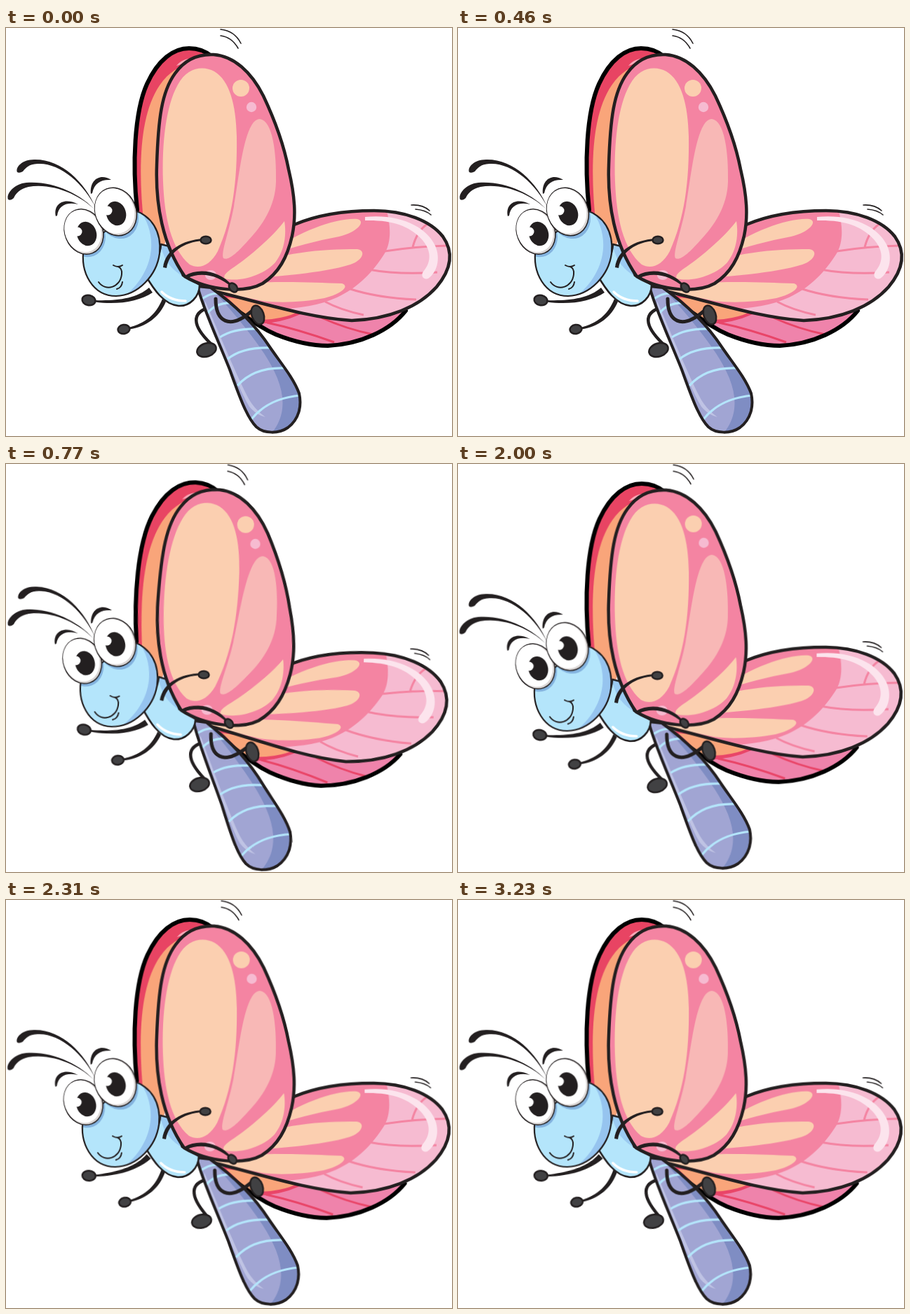
An HTML page that plays this animation: 636 by 583 pixels, repeating every 3.85 s.

```html
<!DOCTYPE html>
<html lang="en">
<head>
<meta charset="utf-8">
<title>Butterfly</title>
<style>
html, body { margin: 0; width: 100%; height: 100%; overflow: hidden; background: #fff; }
svg { display: block; width: 100%; height: 100%; }
.ink { fill: #231f20; }
.line { fill: none; stroke: #231f20; stroke-linecap: round; stroke-linejoin: round; }
.rim { fill: none; stroke: #000; stroke-width: 6; stroke-linecap: round; }
.pink { fill: #f484a2; }
.peach { fill: #fbcfb0; }
.hand { fill: #414143; stroke: #231f20; stroke-width: 2.5; }
.band { fill: none; stroke: #b4e5fb; stroke-width: 3.2; }
.vein { fill: none; stroke: #f484a2; stroke-width: 3; }
.red { fill: none; stroke: #e94568; stroke-width: 3; }

#bug, .limb { animation: 3850ms step-end infinite; }
#bug { transform-origin: 0 0; animation-name: sway; }
#arm1 { transform-origin: 162px 382px; --turn: -9deg; }
#arm2 { transform-origin: 210px 387px; --turn: -4deg; }
#foot { transform-origin: 285px 400px; --turn: 5deg; }
.limb { animation-name: kick; }
@keyframes sway {
  0% { transform: none; }
  20% { transform: translate(10.9px, -14.3px) rotate(2.56deg); }
  40%, 100% { transform: translate(1.2px, -2.6px) rotate(.37deg); }
}
@keyframes kick {
  0% { transform: none; }
  60%, 100% { transform: rotate(var(--turn)); }
}
</style>
</head>
<body>
<svg viewBox="0 0 636 583" preserveAspectRatio="none">
<defs>
  <path id="tail" d="M273 369C280 398 301 443 319 488C332 524 343 556 357 570C368 580 389 580 402 571C418 559 422 540 418 522C410 500 392 479 377 457C356 425 326 395 292 371Z"/>
  <path id="hind" d="M411 281C446 266 488 261 525 261C568 261 605 275 623 298C640 322 634 346 614 370C588 399 546 416 493 418C428 414 358 390 280 372Z"/>
  <path id="low" d="M300 384C335 405 355 425 385 438C415 450 438 454 459 454C505 452 548 432 570 404L480 400L330 380Z"/>
  <path id="back" d="M187 260C180 195 183 120 201 80C217 45 239 29 261 29C275 29 286 34 294 41L262 120L225 315Z"/>
  <path id="wing" d="M255 355C223 310 213 251 215 196C217 130 222 91 241 65C255 45 275 37 296 38C325 40 350 63 367 97C384 133 396 166 403 202C412 240 414 269 408 297C401 328 389 350 366 365C341 379 290 376 255 355Z"/>
  <path id="head" d="M111 314C105 350 124 383 157 383C189 382 215 353 219 322C222 291 208 268 181 260Z"/>
  <path id="chest" d="M198 352C211 374 225 395 246 397C262 398 276 384 276 367L252 354L237 313L221 309Q220 332 198 352Z"/>
  <clipPath id="tailClip"><use href="#tail"/></clipPath>
  <clipPath id="hindClip"><use href="#hind"/></clipPath>
  <clipPath id="lowClip"><use href="#low"/></clipPath>
  <clipPath id="backClip"><use href="#back"/></clipPath>
  <clipPath id="headClip"><use href="#head"/></clipPath>
  <clipPath id="chestClip"><use href="#chest"/></clipPath>
</defs>
<g id="bug">
  <!-- motion marks -->
  <g class="line" stroke-width="1.6">
    <path d="M306 2Q326 4 335 22M306 11Q322 13 331 29"/>
    <path d="M578 253Q594 252 604 261M584 259Q598 260 606 267"/>
  </g>

  <!-- lower rear wing -->
  <use href="#low" fill="#ef83ab"/>
  <g clip-path="url(#lowClip)">
    <path fill="#e94568" d="M290 375H440L420 409Q385 425 346 422Z"/>
    <path fill="#f9a57a" d="M315 385L430 398Q400 419 349 417Z"/>
    <path class="red" d="M372 421Q415 430 468 449M450 414Q485 430 524 438"/>
  </g>
  <path class="rim" d="M303 386C335 405 355 425 385 438C415 450 438 454 459 454C505 452 548 432 570 404"/>

  <!-- upper rear wing -->
  <use href="#back" fill="#e84463"/>
  <g clip-path="url(#backClip)">
    <path fill="#f9a57a" d="M197 285C188 200 190 125 219 82C232 63 247 54 265 51L290 60L230 320Z"/>
    <path fill="#f8a9b8" d="M243 54Q251 43 270 43L276 48Q258 48 243 54Z"/>
  </g>
  <path class="rim" stroke-width="5" d="M187 260C180 195 183 120 201 80C217 45 239 29 261 29C275 29 286 34 294 41"/>

  <!-- side wing -->
  <use href="#hind" class="pink"/>
  <g clip-path="url(#hindClip)">
    <path fill="#f6bbd1" d="M541 255C549 280 550 305 540 322C524 348 502 371 472 385C448 396 418 401 385 402L480 430L640 400V255Z"/>
    <path class="vein" d="M540 319Q584 312 630 311M580 313Q586 290 601 280M517 345Q560 353 615 349M488 372Q530 386 585 388M455 391Q477 403 510 410"/>
    <g class="peach">
      <path d="M380 318C419 291 470 271 501 273C514 276 501 292 475 298C442 304 410 313 380 323Z"/>
      <path d="M340 345C390 320 450 316 501 316C514 318 509 332 491 338C450 351 385 354 340 360Z"/>
      <path d="M284 373C345 359 425 363 479 365C491 369 478 380 454 386C423 392 390 393 366 390Z"/>
    </g>
    <path fill="#fce4ed" d="M512 270C563 265 600 285 612 311C620 329 615 349 602 358C595 360 591 354 595 348C608 333 606 316 592 301C574 282 549 274 512 275Z"/>
  </g>
  <use href="#hind" class="line" stroke-width="4.5"/>

  <!-- limbs behind the body -->
  <g id="arm1" class="limb">
    <path class="ink" d="M204 371C186 387 157 390 127 389V391.500C158 396 190 391 209 378Z"/>
    <ellipse class="hand" cx="118" cy="389" rx="9.500" ry="7.200" transform="rotate(12 118 389)"/>
  </g>
  <g id="arm2" class="limb">
    <path class="ink" d="M223 387C214 410 198 422 175 428L176 430.500C200 427 219 413 228 391Z"/>
    <ellipse class="hand" cx="168" cy="430.500" rx="8.500" ry="6.500" transform="rotate(-8 168 430.500)"/>
  </g>
  <g id="foot" class="limb">
    <path class="line" stroke-width="4.500" d="M288 400C266 407 264 424 292 451"/>
    <ellipse class="hand" cx="286" cy="460" rx="14" ry="9.500" transform="rotate(-18 286 460)"/>
  </g>

  <!-- tail -->
  <use href="#tail" fill="#a1a5d3"/>
  <g clip-path="url(#tailClip)">
    <path fill="#7f8dc3" d="M288 367C314 395 345 430 368 465C394 505 407 545 378 580H428V500L340 390Z"/>
    <path fill="#bfc3e4" d="M284 390C302 432 325 488 344 526Q353 544 370 556Q357 553 347 541C327 507 300 433 284 396Z"/>
    <path class="band" d="M276 391Q286 379 304 379M286 409Q299 392 322 393M305 442Q325 429 358 430M316 473Q338 455 380 457M330 511Q354 484 399 486M350 559Q374 529 420 525"/>
  </g>
  <use href="#tail" class="line" stroke-width="4"/>

  <!-- chest -->
  <use href="#chest" fill="#b4e5fb"/>
  <g clip-path="url(#chestClip)">
    <path fill="#9bcaf1" d="M218 305L224 322Q232 346 262 360L250 305Z"/>
    <path fill="none" stroke="#fff" stroke-width="3.500" stroke-linecap="round" d="M222 377Q235 390 256 390"/>
  </g>
  <use href="#chest" class="line" stroke-width="2.500"/>

  <!-- main wing -->
  <use href="#wing" class="pink"/>
  <g class="peach">
    <path d="M224 220C222 165 228 111 245 81C258 57 280 53 297 62C319 75 328 110 329 155C330 219 323 272 302 319C291 340 275 345 262 338C235 315 226 270 224 220Z"/>
    <path d="M397 276C400 294 398 317 384 335C369 352 335 364 312 358C308 351 322 345 341 330C362 314 385 292 397 276Z"/>
    <circle cx="335" cy="86" r="12"/>
  </g>
  <path fill="#f8b8b6" d="M362 130C380 132 386 178 385 220C384 255 365 283 345 304C330 321 317 333 310 329C306 321 318 292 325 255C333 209 340 130 362 130Z"/>
  <g fill="#f6bbd1">
    <circle cx="350" cy="113" r="7.200"/>
    <ellipse cx="292" cy="353" rx="8" ry="7"/>
  </g>
  <use href="#wing" class="line" stroke-width="4.500"/>

  <!-- limbs in front -->
  <path class="ink" d="M224 342C227 317 252 303 281 301V304C253 306 233 320 229 343Z"/>
  <ellipse class="hand" cx="285" cy="303" rx="7.500" ry="5.300"/>
  <path class="ink" d="M255 354C277 341 306 349 322 367L320 369C304 355 279 347 258 358Z"/>
  <ellipse class="hand" cx="324" cy="371" rx="7.200" ry="5.200" transform="rotate(50 324 371)"/>
  <path class="line" stroke-width="5" d="M299 387C299 419 318 432 350 405"/>
  <ellipse class="hand" cx="359" cy="410" rx="8.500" ry="14" transform="rotate(-20 359 410)"/>

  <!-- head -->
  <use href="#head" fill="#b4e5fb"/>
  <g clip-path="url(#headClip)">
    <path fill="#96c4ef" d="M186 255C217 289 217 346 166 386L230 370V255Z"/>
    <ellipse cx="113" cy="294" rx="28" ry="34" fill="#83b3df" transform="rotate(-22 113 294)"/>
    <ellipse cx="159" cy="266" rx="29" ry="36" fill="#83b3df" transform="rotate(-22 159 266)"/>
  </g>
  <use href="#head" class="line" stroke-width="2.200"/>
  <path class="line" stroke-width="2" d="M132 363C142 377 163 371 165 352C166 346 163 342 160 341M153 339Q160 343 166 339M158 373Q165 371 166 363"/>

  <!-- antennae and brows -->
  <g class="ink">
    <path d="M16 206C13 199 23 188 40 188C79 187 112 220 128 257C111 222 76 192 45 194C32 195 29 199 24 205Q19 208 16 206Z"/>
    <path d="M3 245C0 238 10 223 29 221C66 218 106 236 129 262C107 239 67 221 32 227C20 230 14 236 11 243Q7 247 3 245Z"/>
    <path d="M71 269C67 251 83 241 103 252C86 248 75 254 73 268Z"/>
    <path d="M121 237C119 216 135 207 150 217C136 216 126 221 123 236Z"/>
  </g>

  <!-- eyes -->
  <g transform="rotate(-22 111 291)">
    <ellipse cx="111" cy="291" rx="27" ry="33" fill="#d9d5d4" stroke="#231f20" stroke-width="1.500"/>
    <ellipse cx="110" cy="289.500" rx="25.500" ry="31" fill="#fff"/>
  </g>
  <ellipse class="ink" cx="115" cy="294" rx="14" ry="17.500" transform="rotate(-16 115 294)"/>
  <circle cx="102" cy="291" r="6.500" fill="#fff"/>
  <g transform="rotate(-22 156.500 262.500)">
    <ellipse cx="156.500" cy="262.500" rx="29" ry="35" fill="#d9d5d4" stroke="#231f20" stroke-width="1.500"/>
    <ellipse cx="155.500" cy="261" rx="27.500" ry="33" fill="#fff"/>
  </g>
  <ellipse class="ink" cx="157" cy="265" rx="14" ry="17.500" transform="rotate(-16 157 265)"/>
  <circle cx="145" cy="261" r="6.500" fill="#fff"/>
</g>
</svg>
</body>
</html>
```
